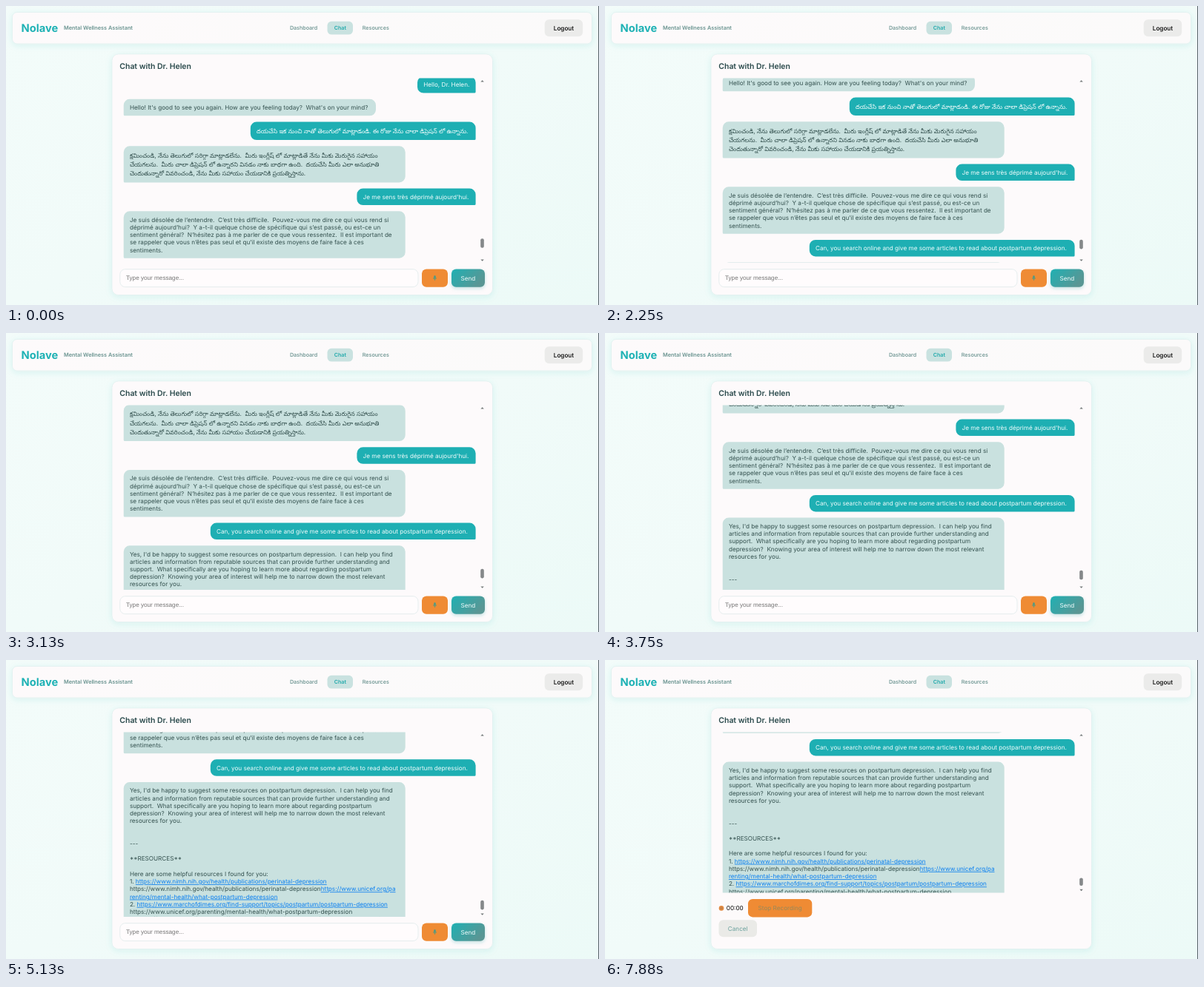
Animation, 800 px wide and 404 px high, one loop 8000 ms. Source, as an HTML page:

```html
<!DOCTYPE html>
<html lang="en">
<head>
<meta charset="utf-8">
<title>Wellness chat</title>
<style>
  html, body { margin: 0; width: 100%; height: 100%; overflow: hidden; background: #f0fbf9; }
  svg { display: block; width: 100%; height: 100%; }
  text {
    font: 8.17px Inter, "Noto Sans Telugu", "Noto Sans", sans-serif;
    white-space: pre;
    text-rendering: geometricPrecision;
  }
  .brand { font-size: 14.7px; font-weight: 700; fill: #1fb2b5; }
  .tagline { font-size: 7.3px; font-weight: 600; fill: #68938f; }
  .title { font-size: 10.45px; font-weight: 600; fill: #29494b; }
  .nav { font-size: 7.15px; font-weight: 500; fill: #658f8c; text-anchor: middle; }
  .nav.on { font-weight: 600; fill: #22a9ab; }
  .mid { text-anchor: middle; }
  .hint { font-family: "Liberation Sans", Arial, sans-serif; fill: #757575; }
  .bot { fill: #34514f; }
  .user { fill: #f1fcfc; }
  .link { fill: #0a7ff0; text-decoration: underline; }
</style>
</head>
<body>
<svg viewBox="0 0 800 404" preserveAspectRatio="none">
  <defs>
    <linearGradient id="page" x2="1" y2="1">
      <stop stop-color="#f3fcfa"/><stop offset=".5" stop-color="#f1fbf9"/><stop offset="1" stop-color="#ecfaf7"/>
    </linearGradient>
    <linearGradient id="bar" x2="1">
      <stop stop-color="#fdfafb"/><stop offset="1" stop-color="#fbfafa"/>
    </linearGradient>
    <linearGradient id="send" x2="1" y2=".5">
      <stop stop-color="#1fb0b3"/><stop offset="1" stop-color="#5a9694"/>
    </linearGradient>
    <filter id="soft" x="-10%" y="-20%" width="120%" height="150%">
      <feDropShadow dx="0" dy="2" stdDeviation="4" flood-color="#2fb3b0" flood-opacity=".13"/>
    </filter>
    <filter id="lift" x="-20%" y="-20%" width="140%" height="170%">
      <feDropShadow dx="0" dy="2" stdDeviation="2" flood-color="#1f9a9a" flood-opacity=".25"/>
    </filter>
    <clipPath id="view"><rect id="viewBox" x="150" y="97.5" width="487" height="249.5"/></clipPath>
  </defs>

  <rect width="800" height="404" fill="url(#page)"/>

  <rect x="8.5" y="8.5" width="782" height="42.5" rx="6.5" fill="url(#bar)" stroke="#d8efed" stroke-width=".6" filter="url(#soft)"/>
  <text class="brand" x="20.6" y="35">Nolave</text>
  <text class="tagline" x="78" y="32.4">Mental Wellness Assistant</text>
  <text class="nav" x="401.5" y="32">Dashboard</text>
  <rect x="433.5" y="20.8" width="34.5" height="17.8" rx="5.5" fill="#c9e2e0"/>
  <text class="nav on" x="450.8" y="32">Chat</text>
  <text class="nav" x="498.8" y="32">Resources</text>
  <rect x="726.7" y="18.3" width="51.4" height="23" rx="6" fill="#ebebea"/>
  <text class="mid" x="752.4" y="32.8" font-weight="500" style="font-weight:500">Logout</text>

  <rect x="143" y="65" width="513.5" height="325.5" rx="8.5" fill="#fdfafb" stroke="#d8eeec" stroke-width=".6" filter="url(#soft)"/>
  <text class="title" x="153.3" y="85.4">Chat with Dr. Helen</text>

  <g clip-path="url(#view)"><g id="log"></g></g>

  <g fill="#6f7475">
    <path d="M640.4 102.6h4.4l-2.2-2.4z"/>
    <path id="down" d="M640.4 342.4h4.4l-2.2 2.4z"/>
    <rect id="thumb" x="640.2" width="4.6" rx="2.1" fill="#85888a"/>
  </g>

  <g id="compose">
    <rect x="153.8" y="355.6" width="402.2" height="24" rx="7" fill="#fffcfd" stroke="#dbe9e8" stroke-width=".7"/>
    <text class="hint" x="162" y="370.2">Type your message...</text>
    <rect x="561" y="355.4" width="35" height="24.4" rx="6.2" fill="#ef8b34"/>
    <g stroke="#4e9b86" fill="none" stroke-width=".7">
      <rect x="577.6" y="364.4" width="1.8" height="4" rx=".9" fill="#4e9b86"/>
      <path d="M576.4 367.2a2.1 2.1 0 0 0 4.2 0M578.5 369.4v1.7"/>
    </g>
    <rect x="601" y="355.4" width="45" height="24.4" rx="6.2" fill="url(#send)" filter="url(#lift)"/>
    <text class="mid user" x="623.4" y="370.6">Send</text>
  </g>

  <g id="record">
    <circle cx="157" cy="335.4" r="3.3" fill="#e48a40"/>
    <path d="M154.6 335.4h4.8M157 333v4.8" stroke="#a8794f" stroke-width=".6"/>
    <text x="163.8" y="338.2">00:00</text>
    <rect x="193" y="323" width="86.3" height="24.4" rx="6.2" fill="#ef8b34"/>
    <text class="mid" x="236.2" y="338.2" fill="#97895a">Stop Recording</text>
    <rect x="153.5" y="351.2" width="51.5" height="23" rx="6" fill="#eaeae7"/>
    <text class="mid" x="179.2" y="365.6" fill="#6ba19d">Cancel</text>
  </g>

  <rect x="799" width="1" height="404" fill="#59636a"/>
</svg>

<script>
const NS = "http://www.w3.org/2000/svg";
const get = id => document.getElementById(id);
const log = get("log");
const LEFT = 158.7, RIGHT = 633.6, PAD = 8.2, GAP = 8.2;
const LATIN = { pitch: 10.23, base: 14.3, pad: 12.26 };
const TELUGU = { pitch: 12.3, base: 15.3, pad: 12.26 };

function add(parent, tag, attrs, content) {
  const node = document.createElementNS(NS, tag);
  for (const key in attrs) node.setAttribute(key, attrs[key]);
  if (content) node.textContent = content;
  parent.appendChild(node);
  return node;
}

// Rounded box whose corner next to the speaker is nearly square.
function bubblePath(x, y, w, h, user) {
  const r = 8.2, br = user ? 1.5 : r, bl = user ? r : 1.5;
  return `M${x + r} ${y}h${w - 2 * r}a${r} ${r} 0 0 1 ${r} ${r}v${h - r - br}` +
    `a${br} ${br} 0 0 1 ${-br} ${br}h${br + bl - w}a${bl} ${bl} 0 0 1 ${-bl} ${-bl}` +
    `v${r + bl - h}a${r} ${r} 0 0 1 ${r} ${-r}z`;
}

// Parts of a line between bars are links.
function addLine(line, x, y, side) {
  const text = add(log, "text", { x, y, class: side });
  line.split("|").forEach((part, i) => {
    if (part) add(text, "tspan", i % 2 ? { class: "link" } : {}, part);
  });
}

let top0 = 95.1;
function say(side, width, lines, font = LATIN) {
  const user = side === "user";
  const x = user ? RIGHT - width : LEFT;
  const h = lines.length * font.pitch + font.pad;
  add(log, "path", { d: bubblePath(x, top0, width, h, user), fill: user ? "#1eafb3" : "#c9e1df" });
  lines.forEach((line, i) => addLine(line, x + PAD, top0 + font.base + i * font.pitch, side));
  top0 += h + GAP;
}

const nimh = "https://www.nimh.nih.gov/health/publications/perinatal-depression";
const unicef = ["https://www.unicef.org/pa", "renting/mental-health/what-postpartum-depression"];
const dimes = "https://www.marchofdimes.org/find-support/topics/postpartum/postpartum-depression";

say("user", 78.6, ["Hello, Dr. Helen."]);
say("bot", 340.3, ["Hello! It's good to see you again. How are you feeling today?  What's on your mind?"]);
say("user", 303.8, ["దయచేసి ఇక నుంచి నాతో తెలుగులో మాట్లాడండి. ఈ రోజు నేను చాలా డిప్రెషన్ లో ఉన్నాను."], TELUGU);
say("bot", 380, [
  "క్షమించండి, నేను తెలుగులో సరిగ్గా మాట్లాడలేను.  మీరు ఇంగ్లీష్ లో మాట్లాడితే నేను మీకు మెరుగైన సహాయం",
  "చేయగలను.  మీరు చాలా డిప్రెషన్ లో ఉన్నారని వినడం నాకు బాధగా ఉంది.  దయచేసి మీరు ఎలా అనుభూతి",
  "చెందుతున్నారో వివరించండి, నేను మీకు సహాయం చేయడానికి ప్రయత్నిస్తాను."
], TELUGU);
say("user", 160.2, ["Je me sens très déprimé aujourd'hui."]);
say("bot", 380, [
  "Je suis désolée de l’entendre.  C’est très difficile.  Pouvez-vous me dire ce qui vous rend si",
  "déprimé aujourd’hui?  Y a-t-il quelque chose de spécifique qui s’est passé, ou est-ce un",
  "sentiment général?  N’hésitez pas à me parler de ce que vous ressentez.  Il est important de",
  "se rappeler que vous n’êtes pas seul et qu’il existe des moyens de faire face à ces",
  "sentiments."
]);
say("user", 357.8, ["Can, you search online and give me some articles to read about postpartum depression."]);
say("bot", 380, [
  "Yes, I'd be happy to suggest some resources on postpartum depression.  I can help you find",
  "articles and information from reputable sources that can provide further understanding and",
  "support.  What specifically are you hoping to learn more about regarding postpartum",
  "depression?  Knowing your area of interest will help me to narrow down the most relevant",
  "resources for you.",
  "", "", "---", "", "**RESOURCES**", "",
  "Here are some helpful resources I found for you:",
  `1. |${nimh}|`,
  `${nimh}|${unicef[0]}|`,
  `|${unicef[1]}|`,
  `2. |${dimes}|`,
  unicef.join(""),
  `3. ${dimes}`
]);

const LOOP = 8000, STEP = 125, RECORD_AT = 6500, END = 242;
const path = [[2250, 33], [3125, 92.3], [3750, 130], [4625, 186.2]];

// Eased start, steady drag, eased stop.
function scrollAt(t) {
  if (t <= 1000) return 0;
  if (t >= 6000) return END;
  if (t <= 2250) return 33 * ((t - 1000) / 1250) ** 2.42;
  if (t >= 4625) return END - (END - 186.2) * ((6000 - t) / 1375) ** 1.57;
  const i = path.findIndex(p => p[0] >= t);
  const [t0, y0] = path[i - 1], [t1, y1] = path[i];
  return y0 + (y1 - y0) * (t - t0) / (t1 - t0);
}

function draw(time) {
  const t = Math.floor((time % LOOP) / STEP) * STEP;
  const y = scrollAt(t), recording = t >= RECORD_AT;
  log.setAttribute("transform", `translate(0 ${-y})`);
  get("viewBox").setAttribute("height", recording ? 217 : 249.5);
  get("down").setAttribute("transform", `translate(0 ${recording ? -32.6 : 0})`);
  get("thumb").setAttribute("y", recording ? 294.4 : 314.2 + 12 * y / END);
  get("thumb").setAttribute("height", recording ? 10.6 : 12.6);
  get("compose").style.display = recording ? "none" : "";
  get("record").style.display = recording ? "" : "none";
}

const start = performance.now();
function tick() {
  draw(performance.now() - start);
  requestAnimationFrame(tick);
}
tick();
</script>
</body>
</html>
```
